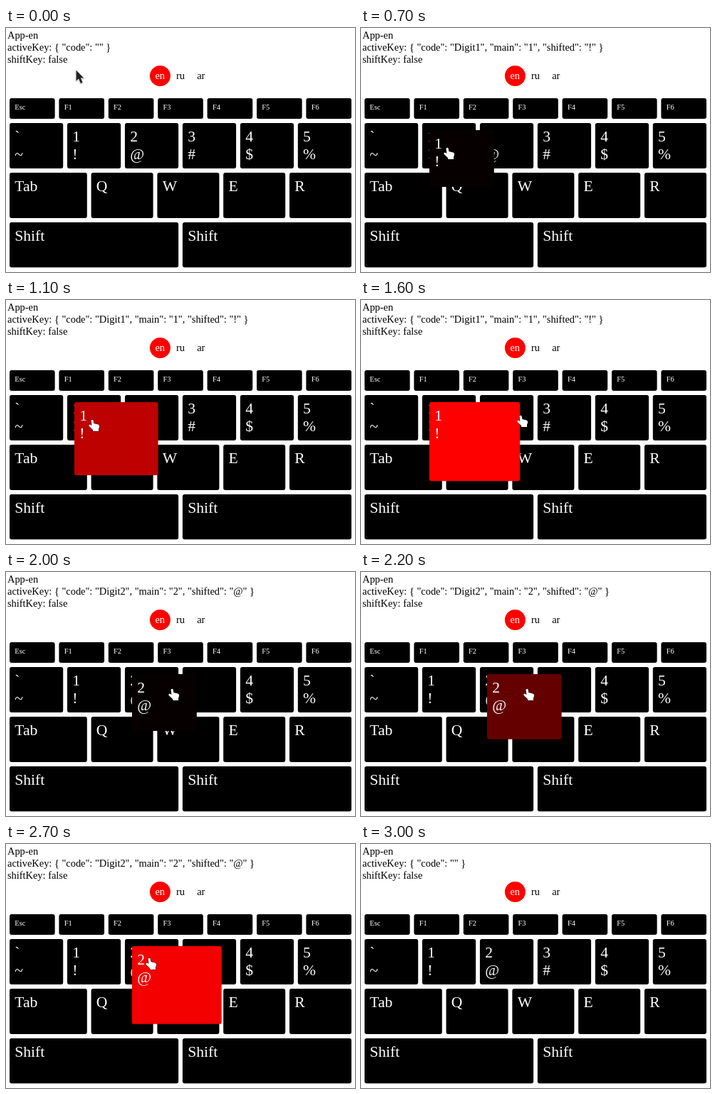
These frames come from a looping animation (490 px wide and 344 px high, 3.3 s). An HTML page with a canvas:

```html
<!DOCTYPE html>
<html lang="en">
<head>
<meta charset="utf-8">
<title>On-screen keyboard</title>
<style>
  html, body { margin: 0; width: 100%; height: 100%; overflow: hidden; background: #fff; }
  canvas { display: block; }
</style>
</head>
<body>
<canvas id="stage" width="490" height="344"></canvas>
<script>
const ctx = document.getElementById('stage').getContext('2d');
const LOOP = 3300, STEP = 100;
const GAP = 5.76, LEFT = 5, WIDTH = 480, PAD = 7.3;
const BODY = 14.4, KEY = 21.6, SMALL = 10.4;

const rows = [
  { y: 99, h: 29, size: SMALL, base: 16, keys: ['Esc', 'F1', 'F2', 'F3', 'F4', 'F5', 'F6'] },
  { y: 134, h: 64, size: KEY, base: 26, keys: ['`~', '1!', '2@', '3#', '4$', '5%'], pairs: true },
  { y: 204, h: 64, size: KEY, base: 26, keys: ['Tab', 'Q', 'W', 'E', 'R'], first: 1.25 },
  { y: 274, h: 63.4, size: KEY, base: 26, keys: ['Shift', 'Shift'] }
];

const presses = [
  { start: 700, end: 1700, key: '1!', index: 1 },
  { start: 2000, end: 3000, key: '2@', index: 2 }
];

// Pointer waypoints: time, x, y, shape
const pointerPath = [
  [0, 98, 59, 'arrow'], [100, 95, 72, 'arrow'], [200, 94, 100, 'arrow'],
  [300, 105, 146, 'hand'], [400, 115, 168, 'hand'],
  [1300, 126, 167, 'hand'], [1400, 157, 165, 'hand'], [1500, 191, 163, 'hand'],
  [1600, 218, 162, 'hand'], [1700, 227, 164, 'hand'],
  [2600, 220, 163, 'hand'], [2700, 195, 160, 'hand'],
  [2800, 154, 156, 'hand'], [2900, 119, 150, 'hand'], [3000, 0, 0, 'none']
];

const arrow = new Path2D('M.5 .5V15.5L4 12.5L6.8 19L9.6 17.8L6.8 11.6H11.2Z');
const hand = new Path2D('M4.5 2Q6 -.2 7.6 1.6L8.4 6L14.5 7.6Q16.4 8.4 16.2 10.5L15 14V17H7.5L6.5 14.5L1.6 10Q.8 8 3 7.6L5.4 9Z');

function ease(x) {
  if (x <= 0 || x >= 1) return x <= 0 ? 0 : 1;
  const curve = (s, a, b) => 3 * s * (1 - s) ** 2 * a + 3 * s * s * (1 - s) * b + s ** 3;
  let lo = 0, hi = 1;
  for (let i = 0; i < 24; i++) {
    const mid = (lo + hi) / 2;
    if (curve(mid, 0.25, 0.25) < x) lo = mid; else hi = mid;
  }
  return curve(lo, 0.1, 1);
}

function text(str, x, y, size, color, align = 'left') {
  ctx.font = `${size}px "Liberation Serif", "Times New Roman", serif`;
  ctx.fillStyle = color;
  ctx.textAlign = align;
  ctx.fillText(str, x, y);
}

function box(x, y, w, h, color) {
  ctx.fillStyle = color;
  ctx.beginPath();
  ctx.roundRect(x, y, w, h, 2.9);
  ctx.fill();
}

function pair(chars, x, y) {
  text(chars[0], x + PAD, y + 26, KEY, '#fff');
  text(chars[1], x + PAD, y + 51, KEY, '#fff');
}

function drawRow({ y, h, size, base, keys, pairs, first = 1 }) {
  const unit = (WIDTH - GAP * (keys.length - 1)) / (keys.length - 1 + first);
  let x = LEFT;
  keys.forEach((key, i) => {
    const w = i ? unit : unit * first;
    box(x, y, w, h, '#000');
    if (pairs) pair(key, x, y);
    else text(key, x + PAD, y + base, size, '#fff');
    x += w + GAP;
  });
}

function drawHeader(press) {
  const fields = press
    ? `"Digit${press.key[0]}", "main": "${press.key[0]}", "shifted": "${press.key[1]}"`
    : '""';
  ['App-en', `activeKey: { "code": ${fields} }`, 'shiftKey: false']
    .forEach((line, i) => text(line, 2, 15 + 17 * i, BODY, '#000'));
  ctx.fillStyle = '#f00';
  ctx.beginPath();
  ctx.arc(216.4, 67.5, 14.5, 0, Math.PI * 2);
  ctx.fill();
  ['en', 'ru', 'ar'].forEach((lang, i) =>
    text(lang, 216.2 + 28.8 * i, 72, BODY, i ? '#000' : '#fff', 'center'));
}

function drawPopup(press, t) {
  const p = ease((t - press.start + 45) / 1000);
  const x = 15 + 80.96 * press.index, y = 144;
  box(x, y, 89.8 + 37.5 * p, 79 + 32.2 * p, `rgb(${Math.round(255 * p)}, 0, 0)`);
  pair(press.key, x, y);
}

function drawPointer(t) {
  const [, x, y, shape] = pointerPath.findLast(point => point[0] <= t);
  if (shape === 'none') return;
  const isArrow = shape === 'arrow', path = isArrow ? arrow : hand;
  ctx.save();
  ctx.translate(x, y);
  ctx.lineJoin = 'round';
  ctx.lineWidth = 1;
  ctx.strokeStyle = isArrow ? '#fff' : '#000';
  ctx.fillStyle = isArrow ? '#222' : '#fff';
  if (isArrow) {
    ctx.shadowColor = 'rgba(0, 0, 0, .4)';
    ctx.shadowBlur = 2;
    ctx.shadowOffsetY = 1;
  }
  ctx.stroke(path);
  ctx.shadowColor = 'transparent';
  ctx.fill(path);
  ctx.restore();
}

function draw(now) {
  const t = Math.floor((now % LOOP) / STEP) * STEP;
  const press = presses.find(p => t >= p.start && t < p.end);
  ctx.fillStyle = '#fff';
  ctx.fillRect(0, 0, 490, 344);
  drawHeader(press);
  rows.forEach(drawRow);
  if (press) drawPopup(press, t);
  drawPointer(t);
}

const origin = performance.now();
function tick() {
  draw(performance.now() - origin);
  requestAnimationFrame(tick);
}
tick();
</script>
</body>
</html>
```
